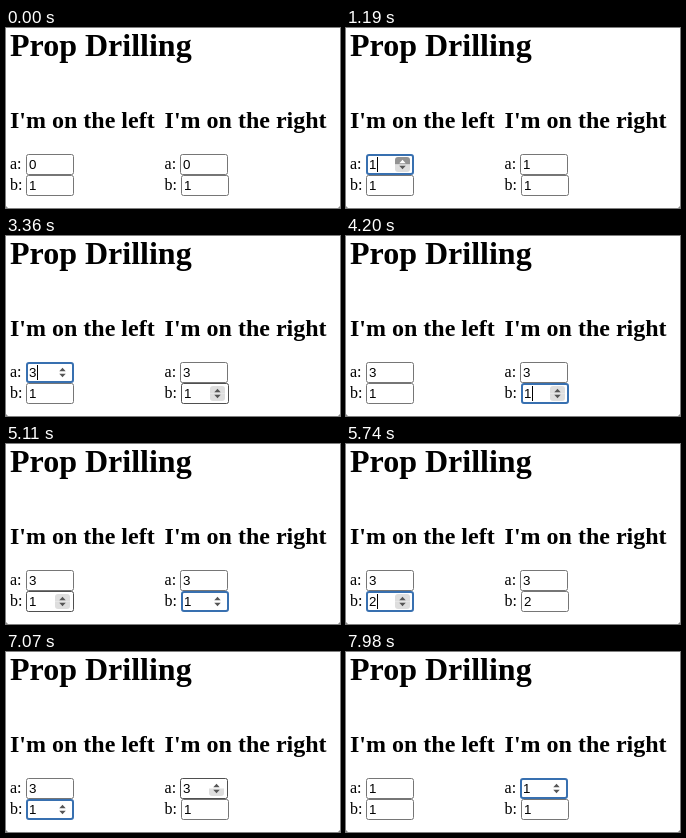
Write an HTML page that moves like this. It is 334 px wide and 180 px high and loops after 8.05 s.

```html
<!DOCTYPE html>
<html lang="en">
<head>
<meta charset="utf-8">
<title>Prop Drilling</title>
<style>
html, body { margin: 0; width: 100%; height: 100%; overflow: hidden; background: #fff; }
svg { display: block; width: 334px; height: 180px; }
text { font-family: "Liberation Serif", Times, serif; font-size: 16px; fill: #000; }
.h1 { font-size: 32px; font-weight: bold; }
.h2 { font-size: 24px; font-weight: bold; }
.value { font: 13.33px "Liberation Sans", Arial, sans-serif; }
.box { fill: #fff; stroke: #767676; }
.hover .box { stroke: #4f4f4f; }
.focus .box { stroke: #3870b0; stroke-width: 2; }
</style>
</head>
<body>
<svg id="stage" viewBox="0 0 334 180">
  <text class="h1" x="4" y="28">Prop Drilling</text>
  <text class="h2" x="4" y="100">I'm on the left</text>
  <text class="h2" x="158.6" y="100">I'm on the right</text>
  <path d="M0 178v2h2zM334 178v2h-2z" fill="#888"/>
</svg>
<script>
const LOOP = 8050;
const stage = document.getElementById('stage');

function add(parent, tag, attrs, text = '') {
  const node = document.createElementNS(stage.namespaceURI, tag);
  for (const key in attrs) node.setAttribute(key, attrs[key]);
  node.textContent = text;
  parent.append(node);
  return node;
}

function makeField(prop, labelX, x, y) {
  add(stage, 'text', { x: labelX, y: y + 15 }, prop + ':');
  const root = add(stage, 'g', { transform: `translate(${x} ${y})` });
  const box = add(root, 'rect', { class: 'box', rx: 2 });
  const value = add(root, 'text', { class: 'value', x: 3, y: 15 });
  const caret = add(root, 'rect', { x: 11, y: 3, width: 1, height: 15 });
  const spinner = add(root, 'g', { transform: 'translate(29 3)' });
  const half = d => add(spinner, 'path', { d });
  const halves = [
    half('M0 7.5V3q0-3 3-3h9q3 0 3 3v4.5z'),
    half('M0 7.5V12q0 3 3 3h9q3 0 3-3V7.5z')
  ];
  const arrows = [half('M4.3 6.3L7.5 2.8 10.7 6.3z'), half('M4.3 8.7L7.5 12.2 10.7 8.7z')];
  return { prop, root, box, value, caret, spinner, halves, arrows };
}

const fields = {
  LA: makeField('a', 4, 20, 126),
  LB: makeField('b', 4, 20, 147),
  RA: makeField('a', 158.6, 174, 126),
  RB: makeField('b', 158.6, 175, 147)
};

// Shading of the hovered spinner's upper and lower half.
const LIGHT = '#dedede', DARK = '#929292', NONE = 'none';
const shades = {
  both: [LIGHT, LIGHT],
  low: [NONE, LIGHT],
  pressUp: [DARK, LIGHT],
  pressDown: [LIGHT, DARK]
};

// Each step changes only the listed parts of the state.
const steps = [
  [0, { a: 0, b: 1, focus: '', hover: '', shade: 'both', caret: false }],
  [700, { hover: 'LA' }],
  [1190, { a: 1, focus: 'LA', shade: 'pressUp', caret: true }],
  [1330, { shade: 'both' }],
  [1820, { caret: false }],
  [1890, { a: 2, shade: 'pressUp', caret: true }],
  [1960, { shade: 'both' }],
  [2030, { a: 3, shade: 'pressUp' }],
  [2170, { shade: 'both' }],
  [2450, { hover: '' }],
  [2520, { caret: false }],
  [2800, { hover: 'RB' }],
  [3080, { caret: true }],
  [3570, { b: 2, focus: 'RB', shade: 'pressUp' }],
  [3850, { shade: 'both' }],
  [4060, { caret: false }],
  [4130, { b: 1, shade: 'pressDown', caret: true }],
  [4200, { shade: 'both' }],
  [4620, { caret: false }],
  [4900, { hover: '' }],
  [4970, { hover: 'LB' }],
  [5250, { caret: true }],
  [5320, { b: 2, focus: 'LB', shade: 'pressUp' }],
  [5740, { shade: 'both' }],
  [5810, { caret: false }],
  [6090, { b: 1, shade: 'pressDown', caret: true }],
  [6160, { shade: 'both' }],
  [6300, { hover: '' }],
  [6580, { caret: false }],
  [6650, { hover: 'RA' }],
  [7000, { shade: 'low' }],
  [7140, { a: 2, focus: 'RA', shade: 'pressDown', caret: true }],
  [7210, { shade: 'low' }],
  [7350, { a: 1, shade: 'pressDown' }],
  [7490, { shade: 'low' }],
  [7910, { hover: 'RB', shade: 'both', caret: false }],
  [7980, { hover: '' }]
];

function stateAt(time) {
  const state = {};
  for (const [start, change] of steps) if (start <= time) Object.assign(state, change);
  return state;
}

function drawField(name, state) {
  const field = fields[name];
  const focused = state.focus === name, hovered = state.hover === name;
  const inset = focused ? 1 : 0.5;
  field.root.setAttribute('class', focused ? 'focus' : hovered ? 'hover' : '');
  for (const [key, v] of [['x', inset], ['y', inset], ['width', 48 - 2 * inset], ['height', 21 - 2 * inset]])
    field.box.setAttribute(key, v);
  field.value.textContent = state[field.prop];
  field.caret.style.display = focused && state.caret ? '' : 'none';
  field.spinner.style.display = focused || hovered ? '' : 'none';
  const shade = hovered ? shades[state.shade] : [NONE, NONE];
  shade.forEach((color, i) => {
    field.halves[i].setAttribute('fill', color);
    field.arrows[i].setAttribute('fill', color === DARK ? '#fff' : '#555');
  });
}

const began = performance.now();
function frame() {
  const state = stateAt((performance.now() - began) % LOOP);
  for (const name in fields) drawField(name, state);
  requestAnimationFrame(frame);
}
frame();
</script>
</body>
</html>
```
